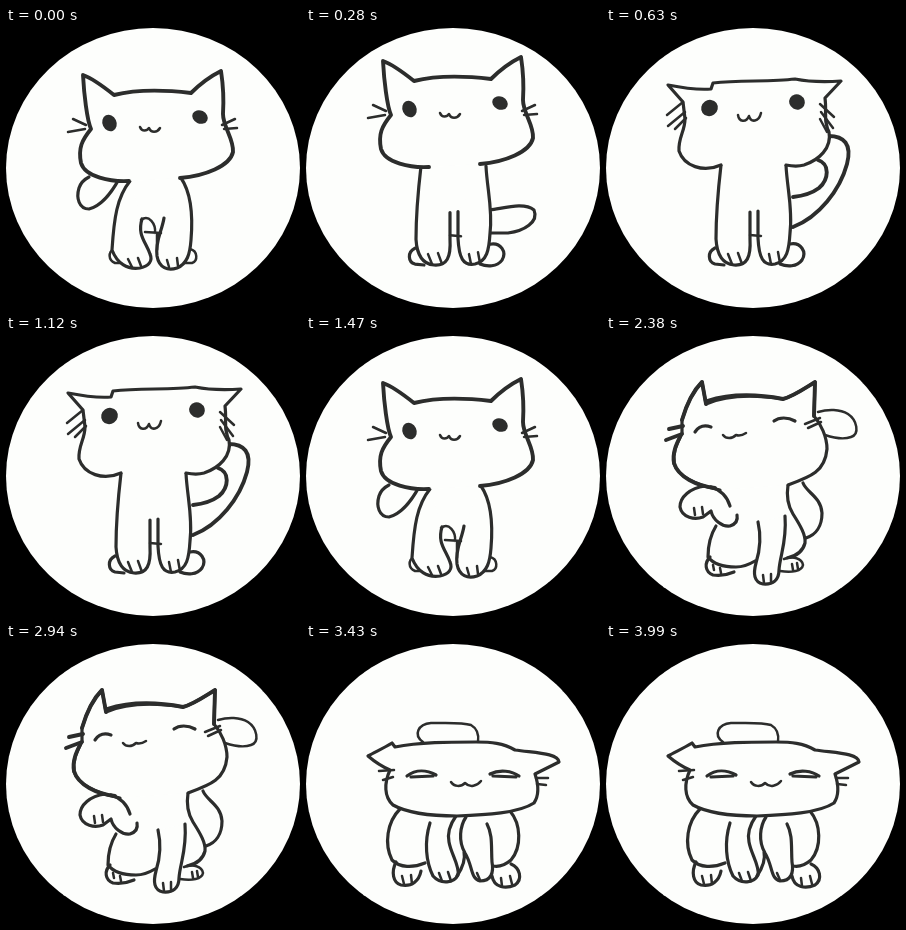
An HTML page that plays this animation: 294x280 px, repeating every 4.06 s.

```html
<!DOCTYPE html>
<html lang="en">
<head>
<meta charset="utf-8">
<title>Dancing cat</title>
<style>
html, body { margin: 0; width: 100%; height: 100%; overflow: hidden; background: #000; }
svg { display: block; width: 100%; height: 100%; }
path { fill: none; stroke: #2c2d2c; stroke-width: 3.2; stroke-linecap: round; stroke-linejoin: round; vector-effect: non-scaling-stroke; }
.skin { fill: #fdfefc; }
.bold { stroke-width: 3.9; }
.thin { stroke-width: 2.5; }
.cat-eye { fill: #2c2d2c; }
</style>
</head>
<body>
<svg viewBox="0 0 294 280">
  <ellipse cx="147" cy="140" rx="147" ry="140" fill="#fdfefc"/>
  <g id="cat"></g>
</svg>
<script>
const STEP = 70, FRAMES = 58, DANCE_A = 25, MIRROR = 305;
const cat = document.getElementById('cat');

const line = (d, c = '') => `<path class="${c}" d="${d}"/>`;
const eye = (x, y, rx, ry, a) =>
  `<ellipse class="cat-eye" cx="${x}" cy="${y}" rx="${rx}" ry="${ry}" transform="rotate(${a} ${x} ${y})"/>`;
const group = (t, s) => `<g transform="${t}">${s}</g>`;
const shift = (s, x, y) => group(`translate(${x} ${y})`, s);
// Stretches the body so the neck moves by dy while the feet stay put.
const stretch = (s, neck, dy, floor = 240) =>
  group(`translate(0 ${floor}) scale(1 ${(floor - neck - dy) / (floor - neck)}) translate(0 ${-floor})`, s);

const perky = {
  neck: 152,
  head:
    line('M123 153C105 154 79 149 75 135C72 120 76 112 85 101C81 92 78 66 77 47C88 51 98 59 108 67C132 61 160 62 185 65C194 56 203 49 215 43C217 56 218 70 217 86C217 99 228 111 227 124C224 138 199 148 174 150', 'skin bold') +
    line('M67 91L80 97M62 104L79 101M216 97L229 91M218 101L231 100', 'thin') +
    eye(103.5, 95, 7, 8.5, -25) + eye(194, 89, 8, 6.5, 25) +
    line('M134 99C136 104 141 103 143 100C145 105 151 105 154 100', 'thin'),
  body:
    line('M108 221C102 224 102 232 109 235L120 235M184 221C192 223 192 233 186 235L178 235', 'thin') +
    line('M124 153C111 169 108 190 106 222C111 235 121 242 134 240C143 238 147 233 144 226C140 214 131 207 136 191M158 190C156 203 149 213 151 228C153 240 162 243 171 240C181 236 184 226 185 212C187 188 186 166 175 150', 'skin') +
    line('M135 192C143 186 150 196 149 205M139 204L155 205M151 207L151 222M122 231L126 239M132 230L135 238M161 232L163 239M171 230L172 238', 'thin'),
  tail: line('M113 151C106 164 95 178 83 181C73 181 70 170 73 160C75 154 79 151 83 149', 'skin')
};

const flat = {
  neck: 137,
  head:
    line('M115 137C97 145 78 138 73 123C72 110 79 103 79 91L77 74L62 57C77 60 92 62 105 61L107 55C134 52 164 54 189 51C204 54 219 54 235 53L219 70C221 84 217 92 223 104C226 120 213 132 198 137C191 139 185 138 180 137', 'skin') +
    line('M77 74L61 87M79 84L62 98M80 90L69 101M214 76L228 89M215 84L227 100M214 91L221 104', 'thin') +
    eye(103.5, 80, 8.5, 8, -35) + eye(191, 74, 8, 7.5, 30) +
    line('M132 87C133 94 140 95 143 88C145 95 153 94 155 85', 'thin'),
  body:
    line('M109 220C101 224 102 234 109 236L118 237M184 216C195 214 201 224 196 232C191 239 181 239 174 236') +
    line('M115 137C112 163 110 187 110 211C111 228 117 236 128 237C141 238 145 229 144 211L144 184M152 183L152 210C153 230 157 238 169 236C181 233 183 222 184 205C187 181 181 160 180 137', 'skin') +
    line('M144 207L155 208M122 226L126 236M132 225L136 236M163 226L165 236M172 224L174 235', 'thin'),
  tail: line('M220 108C239 107 246 117 241 136C234 162 213 189 187 199M212 132C224 136 223 151 213 160C205 166 196 168 187 169', 'bold')
};

const happy = {
  main:
    line('M104 221C98 227 99 236 107 239C114 240 121 239 128 236') +
    line('M110 190C105 198 102 209 102 221C108 229 119 231 130 231C138 231 144 228 149 225') +
    line('M182 149C180 162 182 170 187 178C194 189 200 199 199 207C197 215 191 220 181 222', 'skin') +
    line('M178 223C187 220 196 222 197 229C196 235 186 237 174 235M186 228L187 234M191 227L192 233', 'thin') +
    line('M152 186C155 199 155 211 150 227C147 238 148 246 157 248C167 249 173 244 173 234C174 219 181 206 179 180', 'skin') +
    line('M157 239L158 247M165 238L165 247M107 229L108 234M114 232L115 237', 'thin') +
    line('M99 150C84 152 74 161 74 171C76 182 89 184 97 181L105 175C107 184 116 191 124 190C130 188 132 184 131 179', 'skin') +
    line('M88 172L89 179M96 171L97 178', 'thin') +
    line('M114 154C94 150 74 143 68 128C66 116 72 106 76 97L76 84C81 67 87 55 96 46L100 68C123 58 151 59 177 63C188 60 199 52 209 46L208 80C215 88 221 101 221 113C219 136 204 141 182 149', 'skin') +
    line('M109 152C91 150 72 141 68 127C66 116 71 107 75 99M76 84C81 67 87 55 96 46L100 68M101 65C123 58 151 58 177 63C188 60 199 52 209 46L208 80', 'bold') +
    line('M105 151C115 154 121 160 124 170') +
    line('M63 93L77 90M60 104L76 98', 'bold') +
    line('M199 88L214 82M202 92L215 86', 'thin') +
    line('M89 96C93 90 99 89 105 91M168 85C173 81 182 81 189 85') +
    line('M117 99C120 103 126 103 130 99C133 100 137 99 140 97', 'thin'),
  tail:
    line('M197 147C201 157 215 161 216 177C216 190 210 199 200 202'),
  tip:
    line('M212 76C222 73 234 73 242 78C251 84 254 98 245 101C237 104 228 102 219 99', 'thin')
};

const crouch =
  line('M117 98C107 91 112 80 125 79C140 79 156 78 165 81C172 85 173 91 172 98', 'thin') +
  line('M90 218C85 228 87 239 95 241C106 243 113 237 115 227M205 220C214 224 217 235 209 241C200 245 188 244 186 232', 'skin') +
  line('M94 165C81 178 78 200 86 216C94 224 107 224 119 219') +
  line('M204 167C215 180 216 203 205 216C198 222 192 223 187 222') +
  line('M124 179C118 198 120 218 127 232C135 241 148 239 152 231C154 222 145 210 143 198C141 188 145 179 150 172') +
  line('M160 173C154 182 152 197 159 209C167 222 164 234 174 237C185 237 188 229 186 218C185 204 187 191 181 180M158 208C160 217 155 226 151 232') +
  line('M96 232L98 240M105 231L106 240M133 229L136 237M142 228L145 237M171 229L174 236M195 234L196 242M204 232L206 240', 'thin') +
  line('M84 126C78 139 78 153 87 161C103 170 127 172 151 172C180 171 213 169 228 159C234 150 232 139 229 130L253 118C252 109 229 109 209 106C197 99 185 98 170 98C143 98 114 98 89 103L86 99C78 104 69 108 62 112C69 118 77 123 84 126Z', 'skin') +
  line('M73 127L88 126M77 136L87 133M230 134L242 134M231 140L240 141', 'thin') +
  line('M101 132C110 125 121 126 130 131M105 133L127 132M184 130C194 125 206 127 213 132M187 132L210 133') +
  line('M145 138C148 143 155 143 159 139C164 144 171 142 175 137', 'thin');

const sideTail = line('M83 151C64 151 40 142 31 151C28 163 46 174 64 178C84 182 98 181 111 176', 'skin');
const lowTail = line('M184 190C199 188 218 182 228 190C233 202 218 211 202 213L185 213', 'skin');

const build = (head, body, dy, tail) =>
  tail + stretch(body.body, body.neck, head.neck + dy - body.neck) + shift(head.head, 0, dy);

const paw = (dx = 0, dy = 0, tx = 0, ty = 0) =>
  shift(happy.tail + shift(happy.tip, tx, ty) + happy.main, dx, dy);
const flip = s => group(`translate(${MIRROR} 0) scale(-1 1)`, s);

const bounce = [
  build(perky, perky, 0, perky.tail),
  build(flat, perky, 8, lowTail),
  build(flat, flat, 0, flat.tail),
  build(flat, flat, -6, shift(flat.tail, 5, -5)),
  build(perky, flat, -14, shift(lowTail, 0, -8)),
  build(perky, flat, -9, sideTail),
  build(perky, perky, -4, shift(perky.tail, -8, -3))
];
const half = [crouch, paw(), paw(2, 5, 14, 12), paw(0, 2, 6, 4)];
const sway = [...half, ...half.map(flip)];

let last = -1;
function draw(now) {
  const n = Math.floor(now / STEP) % FRAMES;
  if (n !== last) {
    cat.innerHTML = n < DANCE_A ? bounce[n % bounce.length] : sway[(n - DANCE_A) % sway.length];
    last = n;
  }
}

const start = performance.now();
function tick() {
  draw(performance.now() - start);
  requestAnimationFrame(tick);
}
tick();
</script>
</body>
</html>
```
